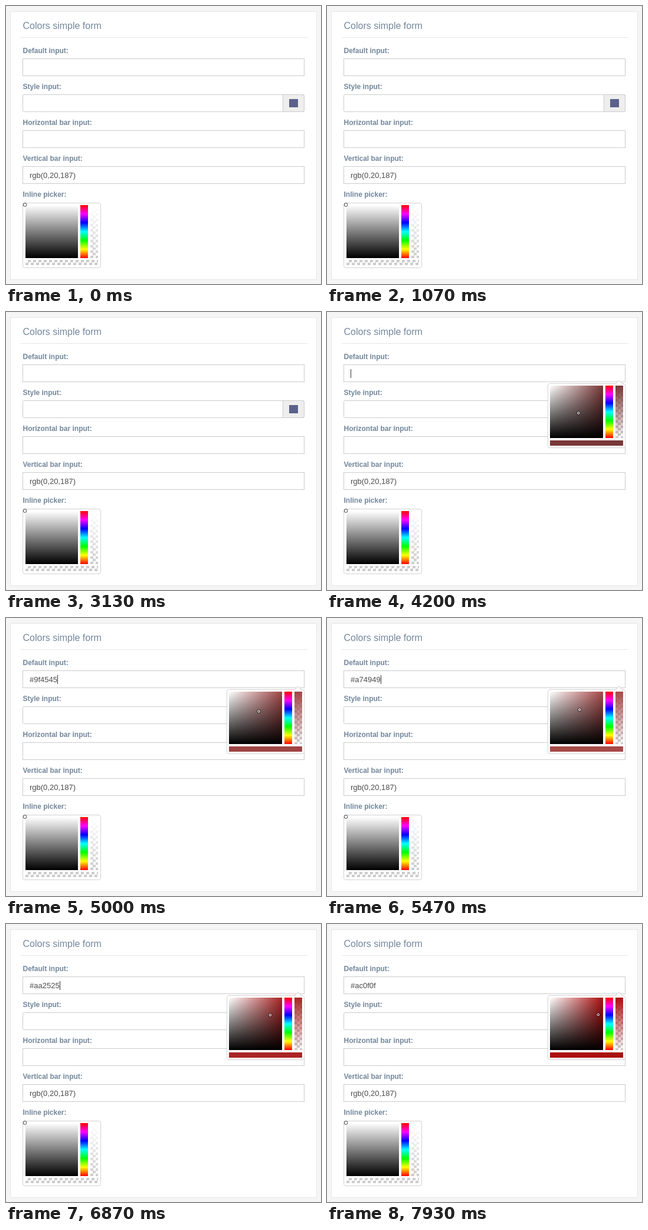
An HTML page for the animation above (8000 ms loop, 534 by 472 pixels).

```html
<!DOCTYPE html>
<html lang="en">
<head>
<meta charset="utf-8">
<title>Color picker form</title>
<style>
  html, body { margin: 0; width: 100%; height: 100%; overflow: hidden; background: #f5f5f5; }
  #stage { position: relative; width: 534px; height: 472px; overflow: hidden; }
  #stage > svg { position: absolute; left: 0; top: 0; }
  text { font-family: "Liberation Sans", Arial, sans-serif; }
  .title { font-size: 16px; fill: #73879c; }
  .label { font-size: 12px; font-weight: bold; fill: #73879c; }
  .value { font-size: 13px; fill: #4c4c4c; }

  .picker {
    --color: #fff;
    position: absolute; box-sizing: border-box; width: 133px; height: 111px;
    background: #fff; border: 1px solid #d2d2d2; border-radius: 4px;
  }
  .picker > * { position: absolute; }
  .inline { left: 28px; top: 334px; }
  .popup { left: 374px; top: 121px; width: 132px; height: 110px; }
  .field {
    left: 4px; top: 3px; width: 89px; height: 90px;
    background: linear-gradient(to top, #000, transparent),
                linear-gradient(to right, #fff, rgba(255,255,255,0)), var(--color);
  }
  .popup .field { left: 3px; width: 90px; height: 89px; }
  .hue, .alpha { top: 3px; width: 13px; height: 90px; }
  .popup .hue, .popup .alpha { height: 89px; }
  .hue { left: 97px; background: linear-gradient(#f00, #f0f, #00f, #0ff, #0f0, #ff0, #f00); }
  .alpha, .checks { background: repeating-conic-gradient(#ccc 0 25%, #fff 0 50%) 0 0 / 9px 9px; }
  .alpha { left: 114px; }
  .alpha::after {
    content: ""; position: absolute; inset: 0;
    background: linear-gradient(var(--color), transparent);
  }
  .bar { left: 4px; top: 96px; width: 123px; height: 9px; }
  .popup .bar { left: 3px; width: 124px; background: var(--color); }
  .ring { left: 0; top: 0; width: 7px; height: 7px; }
  .arrow { left: 113px; top: -7px; }
</style>
</head>
<body>
<div id="stage">
  <svg width="534" height="472" id="form">
    <rect x="7.5" y="9.5" width="519" height="455" fill="#fff" stroke="#e6e6e6"/>
    <path d="M25 53.5H511" stroke="#e4e6e9"/>
    <text class="title" x="28.5" y="39">Colors simple form</text>
    <g id="rows"></g>
    <path d="M469.5 150.5H502.5a3 3 0 0 1 3 3V176.5a3 3 0 0 1-3 3H469.5Z" fill="#eee" stroke="#ccc"/>
    <rect x="480" y="158" width="15" height="14" fill="#5c618b"/>
    <text class="value" x="40" y="292">rgb(0,20,187)</text>
    <text class="value" x="40" y="109" id="value"></text>
    <rect id="caret" y="97" width="1" height="15" fill="#333"/>
  </svg>
  <div class="picker inline">
    <div class="field"></div><div class="hue"></div><div class="alpha"></div>
    <div class="bar checks"></div>
  </div>
  <div class="picker popup" id="popup">
    <svg class="arrow" width="14" height="8"><path d="M0.5 7.5 7 1 13.5 7.5" fill="#fff" stroke="#ccc"/></svg>
    <div class="field"></div><div class="hue"></div><div class="alpha"></div>
    <div class="bar"></div>
  </div>
</div>
<script>
  const LOOP = 8000, STEP = 200 / 3;
  const OPEN = 3400, FIRST_VALUE = 4800;
  const CARET_ON = [[OPEN, 6067], [6660, 7667]];
  // time, red, green and blue
  const DRAG = [
    [4733, 122, 56], [5000, 159, 69], [5470, 167, 73], [6590, 167, 73], [7070, 172, 15]
  ];
  const LABELS = ["Default", "Style", "Horizontal bar", "Vertical bar", "Inline picker"];
  const $ = id => document.getElementById(id);
  const popup = $("popup"), value = $("value"), caret = $("caret");

  $("rows").innerHTML = LABELS.map((name, i) => {
    const y = 80 + 61 * i, last = i === 4;
    const box = last ? "" :
      `<rect x="28.5" y="${y + 9.5}" width="477" height="29" rx="${i === 1 ? 2 : 0}" fill="#fff" stroke="#ccc"/>`;
    return `<text class="label" x="28.5" y="${y}">${name}${last ? ":" : " input:"}</text>${box}`;
  }).join("");

  function addRing(parent) {
    parent.insertAdjacentHTML("beforeend",
      `<svg class="ring" viewBox="0 0 7 7"><g fill="none">
        <circle cx="3.5" cy="3.5" r="2.8" stroke="#000" stroke-width=".9"/>
        <circle cx="3.5" cy="3.5" r="1.9" stroke="#fff" stroke-width="1"/></g></svg>`);
    return parent.lastElementChild;
  }
  const place = (ring, x, y) => {
    ring.style.transform = `translate(${x - 3.5}px, ${y - 3.5}px)`;
  };
  place(addRing(document.querySelector(".inline")), 3, 2.5);
  const ring = addRing(popup);

  function colorAt(t) {
    if (t <= DRAG[0][0]) return DRAG[0].slice(1);
    for (let i = 1; i < DRAG.length; i++) {
      const [t0, ...a] = DRAG[i - 1], [t1, ...b] = DRAG[i];
      if (t <= t1) {
        const p = (t - t0) / (t1 - t0), ease = p * p * (3 - 2 * p);
        return a.map((v, k) => Math.round(v + (b[k] - v) * ease));
      }
    }
    return DRAG[DRAG.length - 1].slice(1);
  }

  const hex = n => n.toString(16).padStart(2, "0");

  function draw(now) {
    const t = Math.floor((now % LOOP) / STEP + 1e-6) * STEP;
    const [red, rest] = colorAt(t);
    const color = "#" + hex(red) + hex(rest) + hex(rest);

    popup.style.visibility = t >= OPEN ? "visible" : "hidden";
    popup.style.setProperty("--color", color);
    place(ring, 2.6 + 90 * (1 - rest / red), 2.6 + 90 * (1 - red / 255));

    const text = t >= FIRST_VALUE - 1 ? color : "";
    if (value.textContent !== text) value.textContent = text;
    const end = text ? value.getComputedTextLength() : 0;
    caret.setAttribute("x", Math.round(40 + end));
    caret.style.visibility =
      CARET_ON.some(([a, b]) => t >= a && t < b - 1) ? "visible" : "hidden";
  }

  const start = performance.now();
  function tick() {
    draw(performance.now() - start);
    requestAnimationFrame(tick);
  }
  tick();
</script>
</body>
</html>
```
